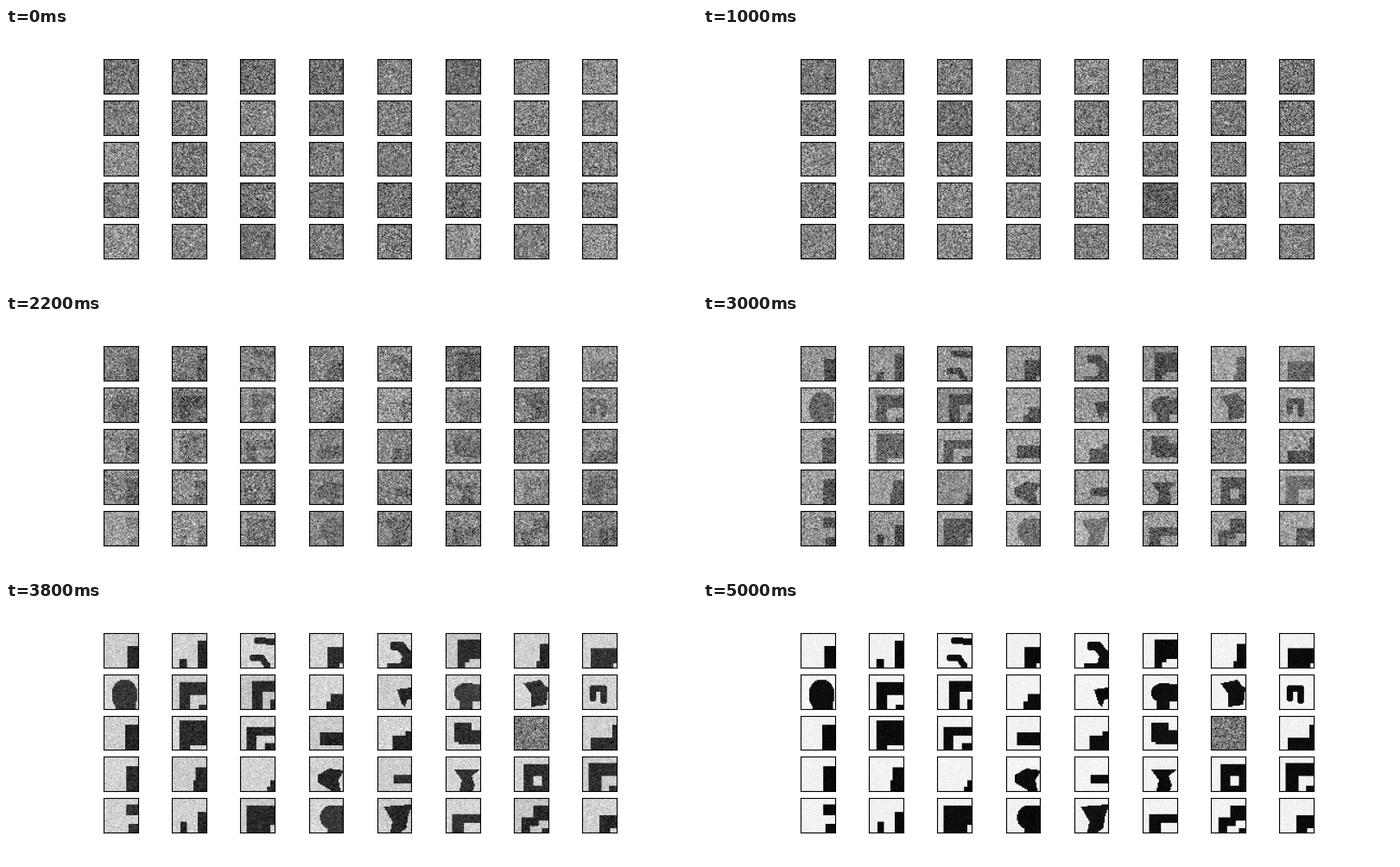
Write a matplotlib script that moves like this. It is 800 px wide and 300 px high and loops after 5.4 s.

```python
from functools import reduce

import matplotlib.pyplot as plt
import numpy as np
from matplotlib.animation import FuncAnimation
from matplotlib.path import Path

N = 32
STEPS = 26
TICKS = 27  # the last step is held for two ticks
Y, X = np.mgrid[0:N, 0:N] + 0.5
CENTRES = np.column_stack([X.ravel(), Y.ravel()])


def box(x0, y0, x1=N, y1=N):
    """Rectangle that runs to the lower right corner by default."""
    return (X > x0) & (X < x1) & (Y > y0) & (Y < y1)


def nest(*corners):
    """Corner blocks inside one another, dark and light in turn."""
    return reduce(np.logical_xor, [box(*c) for c in corners])


def oval(cx, cy, rx, ry):
    return ((X - cx) / rx) ** 2 + ((Y - cy) / ry) ** 2 < 1


def poly(*points):
    return Path(points).contains_points(CENTRES).reshape(N, N)


def stroke(r, *points):
    """Round-ended line of half width r."""
    mask = np.zeros((N, N), bool)
    for (x0, y0), (x1, y1) in zip(points, points[1:]):
        dx, dy = x1 - x0, y1 - y0
        t = ((X - x0) * dx + (Y - y0) * dy) / (dx * dx + dy * dy)
        t = np.clip(t, 0, 1)
        mask |= np.hypot(X - x0 - t * dx, Y - y0 - t * dy) < r
    return mask


masks = [
    # first row
    box(22, 12),
    box(24, 7) | box(7, 24, 14),
    stroke(3, (16, 7), (32, 8)) | stroke(3, (12, 23), (20, 23), (25, 30)),
    nest((17, 13), (28, 28)),
    stroke(4.5, (16, 12), (21, 12), (28, 20), (25, 32)) | box(9, 28),
    box(11, 6) & ~box(18, 27) & ~box(22, 24),
    box(24, 10) | box(21, 26),
    nest((8, 14), (29, 28)),
    # second row
    oval(19.5, 19, 12, 14.5) | box(11, 20, 30),
    nest((7, 7), (17, 19), (25, 28)),
    nest((11, 6), (21, 16), (28, 23)),
    box(20, 18) | box(16, 25),
    poly((18, 14), (32, 12), (32, 22), (27, 24), (26, 30), (23, 28)),
    oval(20, 17, 12, 9.5) | box(13, 20, 25) | box(20, 9, 32, 25),
    poly((9, 8), (25, 5), (29, 11), (32, 12), (30, 28), (16, 30), (16, 18)),
    stroke(3, (10, 22), (10, 13), (20, 13), (20, 24)),
    # third row
    box(20, 9),
    nest((7, 5), (17, 28)),
    nest((6, 11), (15, 19), (23, 26)),
    box(10, 16, 32, 28),
    box(14, 19) | box(26, 15),
    box(8, 7, 24, 25) | box(12, 14, 32, 27),
    box(N, N),
    box(8, 21) | box(28, 9),
    # fourth row
    box(21, 9),
    box(22, 10) | box(20, 22),
    box(28, 22) | box(25, 28),
    poly((8, 17), (19, 11), (32, 13), (27, 22), (29, 32), (21, 32), (8, 24)),
    box(15, 17, 32, 25),
    poly((8, 12), (32, 12), (24, 18), (27, 26), (25, 32), (13, 32), (15, 22)),
    box(9, 7) & ~box(18, 18, 26, 27),
    nest((6, 6), (18, 18), (25, 27)),
    # fifth row
    box(21, 6, 32, 16) | box(23, 24),
    box(24, 13) | box(8, 22, 14),
    nest((6, 7), (28, 25)),
    oval(20, 18, 10, 11) | box(20, 7) | box(17, 20),
    poly((6, 8), (32, 6), (28, 18), (27, 28), (21, 32), (12, 32), (14, 22)),
    nest((6, 15), (17, 23)),
    (box(18, 7) | box(7, 18)) & ~box(15, 26, 23) & ~box(23, 21) | box(26, 28),
    nest((16, 16), (26, 28)),
]
clean = np.where(masks, -1.0, 1.0)


def noise_level(step):
    """Noise relative to signal, falling on a log scale."""
    levels = np.log([60, 2.5, 0.9, 0.18, 0.037])
    return np.exp(np.interp(step, [0, 11, 15, 19, 25], levels))


def noisy(step):
    rng = np.random.default_rng(100 + step)
    return clean + noise_level(step) * rng.standard_normal(clean.shape)


fig, axes = plt.subplots(5, 8, figsize=(8, 3), dpi=100)
tiles = []
for ax, pic in zip(axes.flat, noisy(0)):
    ax.set_xticks([])
    ax.set_yticks([])
    tiles.append(ax.imshow(pic, cmap="gray"))


def update(tick):
    for tile, pic in zip(tiles, noisy(min(tick, STEPS - 1))):
        tile.set_data(pic)
        tile.autoscale()
    return tiles


anim = FuncAnimation(fig, update, frames=TICKS, interval=200,
                     repeat=True, repeat_delay=0)
plt.show()
```
